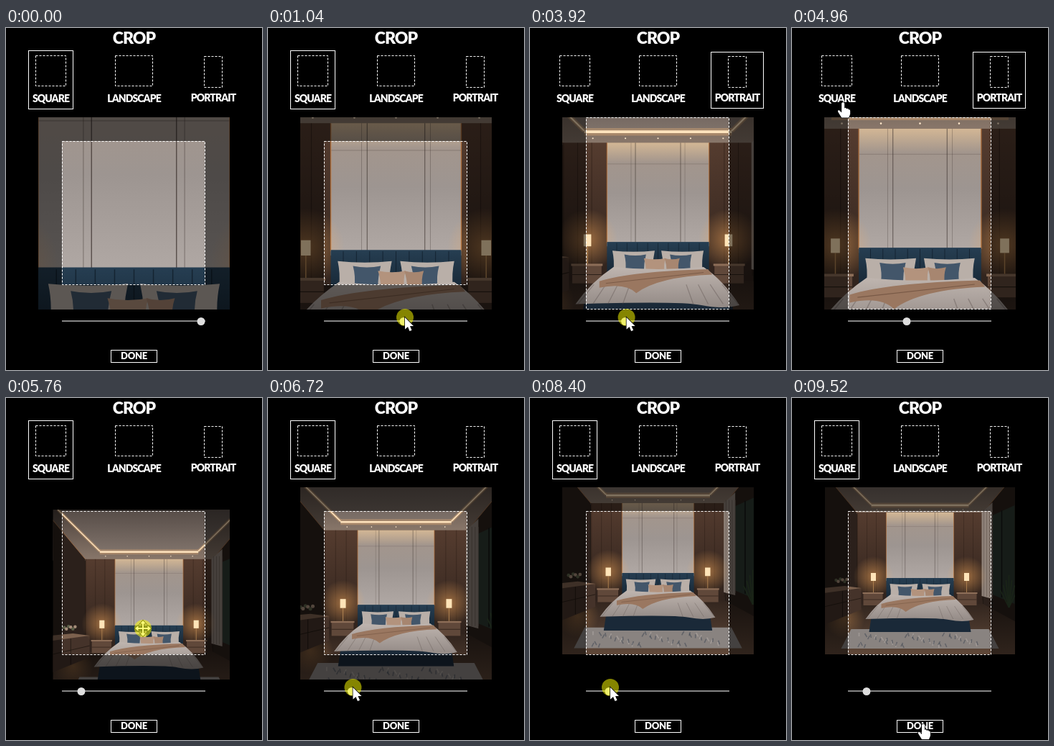
Recreate the animation shown at these times as an HTML page with a canvas. Size 357 by 475 pixels, loop 9.6 s.

```html
<!DOCTYPE html>
<html lang="en">
<head>
<meta charset="utf-8">
<title>Crop tool</title>
<style>
  html, body { margin: 0; width: 100%; height: 100%; overflow: hidden; background: #000; }
  canvas { display: block; }
</style>
</head>
<body>
<canvas id="stage" width="357" height="475"></canvas>
<script>
const ctx = document.getElementById('stage').getContext('2d');
const LOOP = 9600, STEP = 80;
const CENTER = { x: 178.5, y: 257 };
const VIEW = 267, PHOTO = 265, MIN_SLIDER = 104;

const MODES = {
  square:    { x: 62.5,  width: 50, inset: 0, icon: [42, 42], crop: [199, 199], zoom: 1 },
  landscape: { x: 178.5, width: 75, inset: 0, icon: [52, 42], crop: [266, 199], zoom: 1.2 },
  portrait:  { x: 289,   width: 61, inset: 2, icon: [25, 43], crop: [199, 266], zoom: 1.2 }
};

// What the user does; the cursor glides between one action and the next.
const ACTIONS = [
  { start: 320, end: 1040, slide: 189 },
  { start: 1200, end: 1600, slide: 140 },
  { start: 2160, end: 2240, pick: 'landscape' },
  { start: 2480, end: 2680, slide: 112 },
  { start: 3360, end: 3440, pick: 'portrait' },
  { start: 3680, end: 4240, slide: 160 },
  { start: 5120, end: 5200, pick: 'square' },
  { start: 5360, end: 5520, slide: 105 },
  { start: 5600, end: 5760, grab: [170, 288], drag: [21, 32] },
  { start: 6000, end: 6240, grab: [191, 320], drag: [-21, -32] },
  { start: 6560, end: 6880, slide: 128 },
  { start: 7120, end: 7440, grab: [193, 328], drag: [0, -56] },
  { start: 8160, end: 8480, slide: MIN_SLIDER },
  { start: 9280, end: LOOP, grab: [183, 453], drag: [0, 0], idle: true }
];

const mix = (a, b, k) => a + (b - a) * k;
const smooth = k => k * k * (3 - 2 * k);
const clamp = (v, lo, hi) => Math.max(lo, Math.min(hi, v));
const mixPoint = (a, b, k) => a.map((v, i) => mix(v, b[i], k));

function stateAt(t) {
  const s = { slider: 272, mode: 'square', pan: [0, 0], cursor: [255, 470], pressed: false };
  const knob = () => [s.slider + 2, 402];
  let free = STEP;
  for (const a of ACTIONS) {
    const from = a.pick ? [MODES[a.pick].x, 75] : a.grab || knob();
    if (t < a.start) {
      s.cursor = mixPoint(s.cursor, from, smooth(clamp((t - free) / (a.start - free), 0, 1)));
      break;
    }
    const k = Math.min(1, (t - a.start) / (a.end - a.start));
    s.cursor = from;
    if (a.pick) s.mode = a.pick;
    if (a.slide) {
      s.slider = mix(s.slider, a.slide, k);
      s.cursor = knob();
    }
    if (a.drag) {
      s.pan = s.pan.map((v, i) => v + a.drag[i] * k);
      s.cursor = from.map((v, i) => v + a.drag[i] * k);
    }
    s.pressed = !a.idle && t <= a.end + STEP;
    free = a.end;
  }
  return s;
}

function box(fill, x, y, w, h) {
  ctx.fillStyle = fill;
  ctx.fillRect(x, y, w, h);
}

function shape(fill, path) {
  ctx.fillStyle = fill;
  ctx.fill(new Path2D(path));
}

function trapezoid(fill, y0, half0, y1, half1) {
  shape(fill, `M${-half0} ${y0}H${half0}L${half1} ${y1}H${-half1}Z`);
}

function line(color, width, x0, y0, x1, y1) {
  ctx.strokeStyle = color;
  ctx.lineWidth = width;
  ctx.beginPath();
  ctx.moveTo(x0, y0);
  ctx.lineTo(x1, y1);
  ctx.stroke();
}

function circle(fill, x, y, r) {
  ctx.fillStyle = fill;
  ctx.beginPath();
  ctx.arc(x, y, r, 0, Math.PI * 2);
  ctx.fill();
}

function fade(y0, y1, ...colors) {
  const g = ctx.createLinearGradient(0, y0, 0, y1);
  colors.forEach((c, i) => g.addColorStop(i / (colors.length - 1), c));
  return g;
}

function glow(x, y, r, alpha) {
  const g = ctx.createRadialGradient(x, y, 0, x, y, r);
  g.addColorStop(0, `rgba(255,175,95,${alpha})`);
  g.addColorStop(1, 'rgba(255,175,95,0)');
  box(g, x - r, y - r, 2 * r, 2 * r);
}

// Draws the same thing on the right and, flipped, on the left.
function bothSides(paint) {
  for (const side of [1, -1]) {
    ctx.save();
    ctx.scale(side, 1);
    paint(side);
    ctx.restore();
  }
}

function pillow(fill, x, y, w, h) {
  shape(fill, `M${x} ${y}q${w / 2} 2 ${w} 0q-2 ${h / 2} -1 ${h}h${3 - w}q0 ${-h / 2} -2 ${-h}`);
}

// The room is drawn around x = 0, from y = 0 at the ceiling to y = 265.
function drawRoom() {
  box(fade(0, 70, '#4a3f39', '#8a786b'), -134, 0, 268, 70);
  trapezoid(fade(0, 57, '#564c47', '#7f726a'), 0, 127, 57, 68);
  for (const [color, width] of [['rgba(255,190,120,.3)', 7], ['#ffe3bd', 2.4]]) {
    line(color, width, -68, 58, 68, 58);
    bothSides(() => line(color, width * .6, 126, 0, 68, 57));
  }
  for (let x = -60; x <= 60; x += 30) circle('#ffe9cc', x, 64, .7);

  box(fade(68, 190, '#553c2f', '#30231d'), -88, 68, 176, 130);
  box(fade(195, 265, '#32251e', '#604839'), -134, 195, 268, 70);
  bothSides(() => {
    for (let x = 61; x < 88; x += 13) line('rgba(20,12,8,.4)', .6, x, 68, x, 190);
    shape('#2b201b', 'M134 13L88 68V195L134 220Z');
    line('#a06c45', .8, 134, 13, 88, 68);
  });
  drawWindow();
  drawDresser();

  box(fade(68, 160, '#a6968a', '#9d9591', '#b0a8a4'), -47, 68, 94, 95);
  box(fade(68, 86, 'rgba(255,215,160,.5)', 'rgba(255,215,160,0)'), -47, 68, 94, 18);
  line('rgba(90,78,72,.5)', .4, -47, 87.5, 47, 87.5);
  bothSides(() => {
    line('rgba(60,50,46,.75)', .5, 20.8, 68, 20.8, 160);
    line('rgba(60,50,46,.4)', .4, 24.8, 68, 24.8, 160);
    line('#b0713f', .7, 47, 68, 47, 160);
  });
}

function drawWindow() {
  shape('#2c3830', 'M101 72L132 58V195L101 182Z');
  line('#151716', 1.5, 114, 65, 114, 186);
  for (let i = 0; i < 7; i++) line('#34482f', 1.6, 124, 200, 112 + i * 4, 155 + Math.abs(i - 3) * 7);
  shape('#8e8178', 'M86 68L101 54V188L86 184Z');
  for (let x = 89; x < 102; x += 4) line('#6c6059', .8, x, 64, x, 185);
}

function drawDresser() {
  glow(-105, 215, 28, .3);
  shape('#45332a', 'M-134 175L-82 173V203L-134 224Z');
  shape('#7c614e', 'M-134 173L-105 170L-82 173L-134 180Z');
  line('#211812', .8, -134, 199, -82, 187);
  line('#211812', .8, -108, 177, -108, 213);
  for (let i = 0; i < 6; i++) circle(i % 2 ? '#a58d79' : '#5c6049', -117 + i * 3, 162 + 2 * Math.sin(i * 2), 2.2);
}

function drawRug() {
  trapezoid('#898380', 230, 96, 257, 110);
  for (let i = 0; i < 50; i++) {
    const x = -85 + (i * 37) % 170, y = 235 + (i * 11) % 17;
    line(i % 3 ? 'rgba(60,68,80,.5)' : 'rgba(185,178,172,.5)', 1.5, x, y, x + 3 * Math.sin(i), y + 5);
  }
}

function drawNightstands() {
  bothSides(() => {
    glow(65, 157, 28, .5);
    box('#60483a', 52, 180, 27, 17);
    box('#8d6e58', 51, 179, 29, 2);
    line('#2c2019', .7, 52, 189, 79, 189);
    line('#b88955', .8, 65, 163, 65, 179);
    box('#ffe4b8', 61.5, 152, 7, 11);
  });
}

function drawBed() {
  box(fade(159, 188, '#263e52', '#172735'), -47, 159, 94, 32);
  for (let x = -38; x < 47; x += 9.5) line('rgba(10,20,30,.6)', .5, x, 160, x, 184);
  bothSides(() => {
    pillow('#b9afa8', 3, 167, 39, 18);
    pillow('#43566a', 11, 170.5, 20, 15);
  });
  pillow('#b3937d', -13, 174, 20, 12);
  pillow('#a78670', 6, 174, 14, 12);

  trapezoid('#1a2938', 214, 68, 234, 71);
  shape(fade(181, 222, '#c0b6b0', '#8f8682'), 'M-41 182Q0 186 42 182Q60 194 75 217Q60 221 40 217T-76 216Q-62 196 -41 182');
  bothSides(() => {
    for (let x = 26; x < 60; x += 11) line('rgba(80,70,66,.35)', .8, x, 198, x * 1.25, 216);
  });
  shape('#9a7760', 'M-54 195Q-25 186 46 184L50 189Q0 191 -20 206Q-30 196 -54 201Z');
  line('#785946', .6, -48, 197, 42, 187);
}

function drawPhoto({ slider, pan }, mode, crop) {
  const zoom = mode.zoom + (slider - MIN_SLIDER) * .011;
  const half = PHOTO / 2 * zoom;
  const [cropX, cropY, cropW, cropH] = crop;
  const cx = clamp(CENTER.x + pan[0], cropX + cropW - half, cropX + half);
  const cy = clamp(CENTER.y + pan[1], cropY + cropH - half, cropY + half);
  const view = new Path2D();
  view.rect(45, 124, VIEW, VIEW);

  ctx.save();
  ctx.clip(view);
  ctx.save();
  ctx.translate(cx, cy);
  ctx.scale(zoom, zoom);
  ctx.beginPath();
  ctx.rect(-PHOTO / 2, -PHOTO / 2, PHOTO, PHOTO);
  ctx.clip();
  ctx.translate(0, -PHOTO / 2);
  drawRoom();
  drawRug();
  drawNightstands();
  drawBed();
  ctx.restore();
  view.rect(...crop);
  ctx.fillStyle = 'rgba(0,0,0,.5)';
  ctx.fill(view, 'evenodd');
  ctx.restore();
}

function outline([x, y, w, h], dash = []) {
  ctx.setLineDash(dash);
  ctx.strokeStyle = '#fff';
  ctx.lineWidth = 1;
  ctx.strokeRect(Math.floor(x) + .5, Math.floor(y) + .5, w, h);
  ctx.setLineDash([]);
}

function label(text, x, y, size, spacing) {
  ctx.font = `900 ${size}px Lato, sans-serif`;
  ctx.letterSpacing = spacing + 'px';
  ctx.textAlign = 'center';
  ctx.fillStyle = '#fff';
  ctx.fillText(text, x, y);
}

function drawOption(name, { x, width, inset, icon: [w, h] }, selected) {
  outline([x - w / 2, 38 + inset / 2, w, h], [3, 2]);
  label(name.toUpperCase(), x, 102.5 - inset / 2, 14, -.9);
  if (selected) outline([x - width / 2 - 6, 31 + inset, width + 12, 81 - 1.5 * inset]);
}

const CURSORS = {
  arrow: new Path2D('M0 0V16.5L4 13 6.5 19 9.5 17.8 7 12H12Z'),
  move: new Path2D('M0-11 4-6.5H1V-1H6.5V-4L11 0 6.5 4V1H1V6.5H4L0 11-4 6.5H-1V1H-6.5V4L-11 0-6.5-4V-1H-1V-6.5H-4Z'),
  hand: new Path2D('M-2 1Q0-2 2 1V8Q4 6 5 9Q7 7 8 10Q10 9 10 12V16L8 21H-2L-7 13Q-8 10-5 11L-2 14Z')
};

function cursorKind(x, y) {
  if (y < 115 || y > 446 && x < 212) return 'hand';
  return y > 124 && y < 391 ? 'move' : 'arrow';
}

function drawCursor({ cursor: [x, y], pressed }) {
  const kind = cursorKind(x, y);
  const highlight = () => pressed && circle('rgba(255,255,0,.52)', x, y, 12);
  if (kind !== 'move') highlight();
  ctx.save();
  ctx.translate(x, y);
  ctx.strokeStyle = '#000';
  ctx.lineWidth = 1.5;
  ctx.stroke(CURSORS[kind]);
  ctx.fillStyle = '#fff';
  ctx.fill(CURSORS[kind]);
  ctx.restore();
  if (kind === 'move') highlight();
}

function draw(t) {
  const state = stateAt(t);
  const mode = MODES[state.mode];
  const [cropW, cropH] = mode.crop;
  const crop = [Math.floor(CENTER.x - cropW / 2 - .5), Math.floor(CENTER.y - cropH / 2), cropW, cropH];

  box('#000', 0, 0, 357, 475);
  label('CROP', CENTER.x, 22, 23, -1);
  for (const name in MODES) drawOption(name, MODES[name], name === state.mode);
  drawPhoto(state, mode, crop);
  outline(crop, [3, 2]);

  box('#858585', 78, 406, 200, 2);
  circle('#dedede', state.slider, 407.5, 5.5);
  outline([146, 447, 64, 17]);
  label('DONE', CENTER.x, 460, 13, -.3);
  if (t >= STEP) drawCursor(state);
}

function frame(now) {
  draw(Math.floor(now % LOOP / STEP) * STEP);
  requestAnimationFrame(frame);
}
requestAnimationFrame(frame);
</script>
</body>
</html>
```
